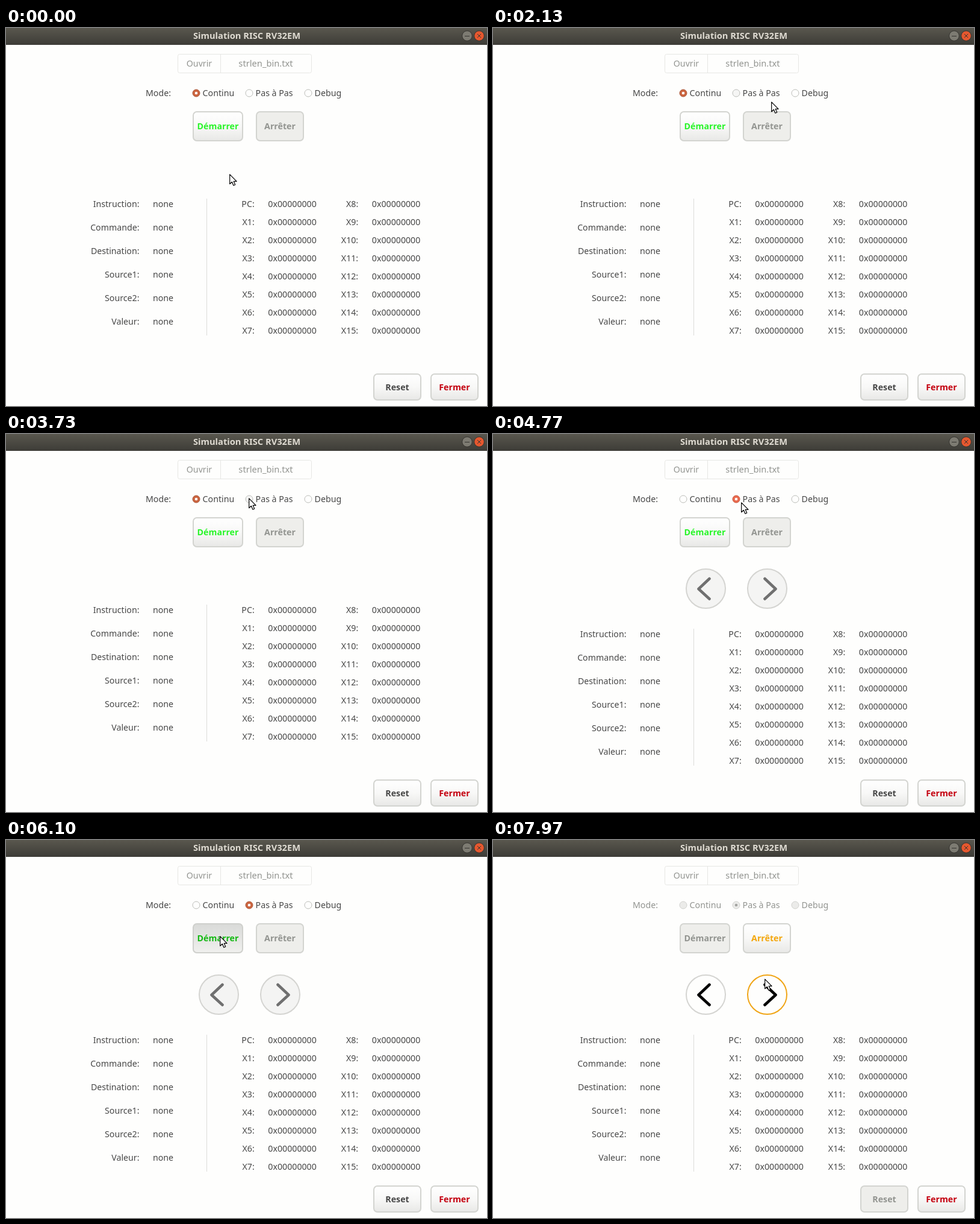
An HTML page that plays this animation: 799x627 px, repeating every 8000 ms.

```html
<!DOCTYPE html>
<html lang="fr">
<head>
<meta charset="utf-8">
<title>Simulation RISC RV32EM</title>
<style>
  html, body { margin: 0; width: 100%; height: 100%; overflow: hidden; background: #fefefd; }
  svg { display: block; width: 799px; height: 627px; }
  text { font: 14.2px "Noto Sans", "Open Sans", sans-serif; fill: #474747; white-space: pre; }
  .bold { font-weight: 700; text-anchor: middle; }
  .mid { text-anchor: middle; }
  .end { text-anchor: end; }
  .dim { fill: #929490; }
  .title { font-size: 14.7px; fill: #dfdbd2; }
  .file { font-size: 14.7px; }
  .frame { fill: none; stroke: #e6e7e4; }

  .btn rect { fill: url(#raised); stroke: #d3d4d0; stroke-width: 2; }
  .btn.off rect { fill: #eeeeeb; }
  .btn.down rect { fill: url(#sunken); stroke: #cfd0cc; }
  .go text { fill: #28f528; }
  .go.down text { fill: #13b913; }
  .stop text { fill: #f3a60d; }
  .quit text { fill: #c4000f; }
  .btn.off text { fill: #929490; }

  .ring { fill: #fefefd; stroke: #bcbdb9; }
  .dot { fill: none; }
  .over .ring { fill: #f5f5f4; }
  .on .ring { fill: #cc6540; stroke: #a9593a; }
  .on .dot { fill: #fff; }
  .on.over .ring { fill: #ea6b50; stroke: #c9573d; }
  .locked text { fill: #929490; }
  .locked .ring { fill: #ebebe9; stroke: #d0d1cd; }
  .locked .on .dot { fill: #a3a4a1; }

  .nav circle { fill: #fefefd; stroke: #d4d4d1; stroke-width: 2; }
  .nav path { fill: none; stroke: #000; stroke-width: 4.6; stroke-linecap: round; stroke-linejoin: round; }
  .nav.off circle { fill: #f4f4f3; }
  .nav.off path { stroke: #707070; }
  .nav.over circle { stroke: #f0a516; }
</style>
</head>
<body>
<svg viewBox="0 0 799 627">
  <defs>
    <linearGradient id="bar" x2="0" y2="1">
      <stop stop-color="#59574e"/><stop offset="1" stop-color="#3d3c37"/>
    </linearGradient>
    <linearGradient id="raised" x2="0" y2="1">
      <stop stop-color="#fff"/><stop offset=".5" stop-color="#f8f8f7"/><stop offset="1" stop-color="#e8e8e6"/>
    </linearGradient>
    <linearGradient id="sunken" x2="0" y2="1">
      <stop stop-color="#d9dad8"/><stop offset="1" stop-color="#f0f0ee"/>
    </linearGradient>
  </defs>

  <rect width="799" height="28" fill="url(#bar)"/>
  <text class="bold title" x="400" y="18">Simulation RISC RV32EM</text>
  <g stroke="#34332f">
    <circle cx="766" cy="13" r="8.3" fill="#7d7b72"/>
    <path d="M762 13.5h8"/>
    <circle cx="786" cy="13" r="8.3" fill="#e6582f"/>
    <path d="M783 10l6 6m0-6l-6 6"/>
  </g>

  <rect class="frame" x="285.5" y="43.5" width="222" height="31" rx="3"/>
  <path class="frame" d="M356.5 44v30"/>
  <text class="mid dim" x="321" y="64">Ouvrir</text>
  <text class="mid dim file" x="431.5" y="64">strlen_bin.txt</text>

  <g id="modes"><text x="232" y="113">Mode:</text></g>
  <g id="buttons"></g>
  <g id="navs"></g>
  <g id="table"><path d="M333.5 283v227" stroke="#dbdcd9"/></g>

  <path id="cursor" d="M.7 .9V16.7L4.4 13.3 6.9 19.2 9.7 18 7.2 12.3H12.1Z"
        fill="#fff" stroke="#000" stroke-width="1.2" stroke-linejoin="round"/>
</svg>
<script>
const LOOP = 8000, PICK = 3930, PRESS = 6100, RUN = 6230;
const $ = id => document.getElementById(id);

function add(parent, tag, attrs, content = '') {
  const el = document.createElementNS('http://www.w3.org/2000/svg', tag);
  for (const k in attrs) el.setAttribute(k, attrs[k]);
  el.textContent = content;
  parent.append(el);
  return el;
}

function button(kind, label, x, y, w, h) {
  const g = add($('buttons'), 'g', { class: 'btn ' + kind });
  add(g, 'rect', { x: x + 1, y: y + 1, width: w - 2, height: h - 2, rx: 6 });
  add(g, 'text', { class: 'bold', x: x + w / 2, y: y + h / 2 + 5 }, label);
  return g;
}

function radio(label, x) {
  const el = add($('modes'), 'g', {});
  add(el, 'circle', { class: 'ring', cx: x, cy: 108, r: 6 });
  add(el, 'circle', { class: 'dot', cx: x, cy: 108, r: 2.3 });
  add(el, 'text', { x: x + 10.6, y: 113 }, label);
  return { el, hit: (px, py) => px > x - 9 && px < x + 75 && py > 96 && py < 126 };
}

function nav(x, dir) {
  const el = add($('navs'), 'g', { class: 'nav' });
  add(el, 'circle', { cx: x, cy: 256.5, r: 32.5 });
  add(el, 'path', { d: `M${x + 5 - dir * 9} 240l${dir * 18} 17 ${-dir * 18} 16.5`,
    transform: `translate(${dir < 0 ? -8 : 0} 0)` });
  return { el, hit: (px, py) => Math.hypot(px - x, py - 256.5) < 33.5 };
}

function row(label, value, end, left, y) {
  add($('table'), 'text', { class: 'end', x: end, y }, label + ':');
  add($('table'), 'text', { x: left, y }, value);
}

const start = button('go', 'Démarrer', 310, 138, 84, 50);
const stop = button('stop', 'Arrêter', 415, 138, 80, 50);
const reset = button('', 'Reset', 610, 573, 80, 45);
button('quit', 'Fermer', 705, 573, 80, 45);

const radios = [radio('Continu', 316), radio('Pas à Pas', 404), radio('Debug', 502)];
const navs = [nav(353.5, -1), nav(455.5, 1)];

['Instruction', 'Commande', 'Destination', 'Source1', 'Source2', 'Valeur'].forEach((name, i) =>
  row(name, 'none', 221.5, 244, 297 + 39 * i));
for (let i = 0; i < 16; i++) {
  const shift = i > 7 ? 172.5 : 0;
  row(i ? 'X' + i : 'PC', '0x00000000', 412.7 + shift, 435.3 + shift, 297 + 30 * (i % 8));
}

// turning points of the pointer: time, x, y
const keys = [
  [0, 371, 242], [730, 371, 242], [1330, 413, 135], [1530, 417, 121], [1830, 400, 113],
  [2230, 473, 124], [2930, 440, 123], [3230, 394, 105], [3430, 425, 104], [3730, 403, 106],
  [4330, 403, 106], [4770, 412, 113], [5070, 366, 122], [5470, 368, 163], [5870, 355, 159],
  [6470, 355, 159], [7070, 246, 197], [7370, 343, 241], [7970, 451, 230], [LOOP, 451, 230]
];

// monotone curve through the keys: still at turns, flowing elsewhere
function curve(t, axis) {
  const rate = i => keys[i] && keys[i + 1]
    ? (keys[i + 1][axis] - keys[i][axis]) / (keys[i + 1][0] - keys[i][0]) : 0;
  const slope = i => {
    const a = rate(i - 1), b = rate(i);
    return a * b > 0 ? 2 * a * b / (a + b) : 0;
  };
  const i = keys.findIndex(k => k[0] > t) - 1;
  const span = keys[i + 1][0] - keys[i][0], k = (t - keys[i][0]) / span, r = 1 - k;
  return Math.round(keys[i][axis] * r * r * (1 + 2 * k) + keys[i + 1][axis] * k * k * (3 - 2 * k)
    + span * k * r * (slope(i) * r - slope(i + 1) * k));
}

// the screen is sampled ten times a second
function sample(t) {
  const phase = t < 4500 ? 30 : 70;
  return Math.max(0, Math.floor((t - phase) / 100) * 100 + phase);
}

function draw(t) {
  const at = sample(t), x = curve(at, 1), y = curve(at, 2);
  const picked = t >= PICK, running = t >= RUN;
  $('cursor').setAttribute('transform', `translate(${x} ${y})`);
  $('table').setAttribute('transform', `translate(0 ${picked ? 40 : 0})`);
  $('navs').style.display = picked ? '' : 'none';
  $('modes').classList.toggle('locked', running);
  radios.forEach(({ el, hit }, i) => {
    el.classList.toggle('on', i === +picked);
    el.classList.toggle('over', !running && hit(x, y));
  });
  navs.forEach(({ el, hit }) => {
    el.classList.toggle('off', !running);
    el.classList.toggle('over', running && hit(x, y));
  });
  start.classList.toggle('down', t >= PRESS && !running);
  start.classList.toggle('off', running);
  stop.classList.toggle('off', !running);
  reset.classList.toggle('off', running);
}

function tick() {
  draw(performance.now() % LOOP);
  requestAnimationFrame(tick);
}
tick();
</script>
</body>
</html>
```
